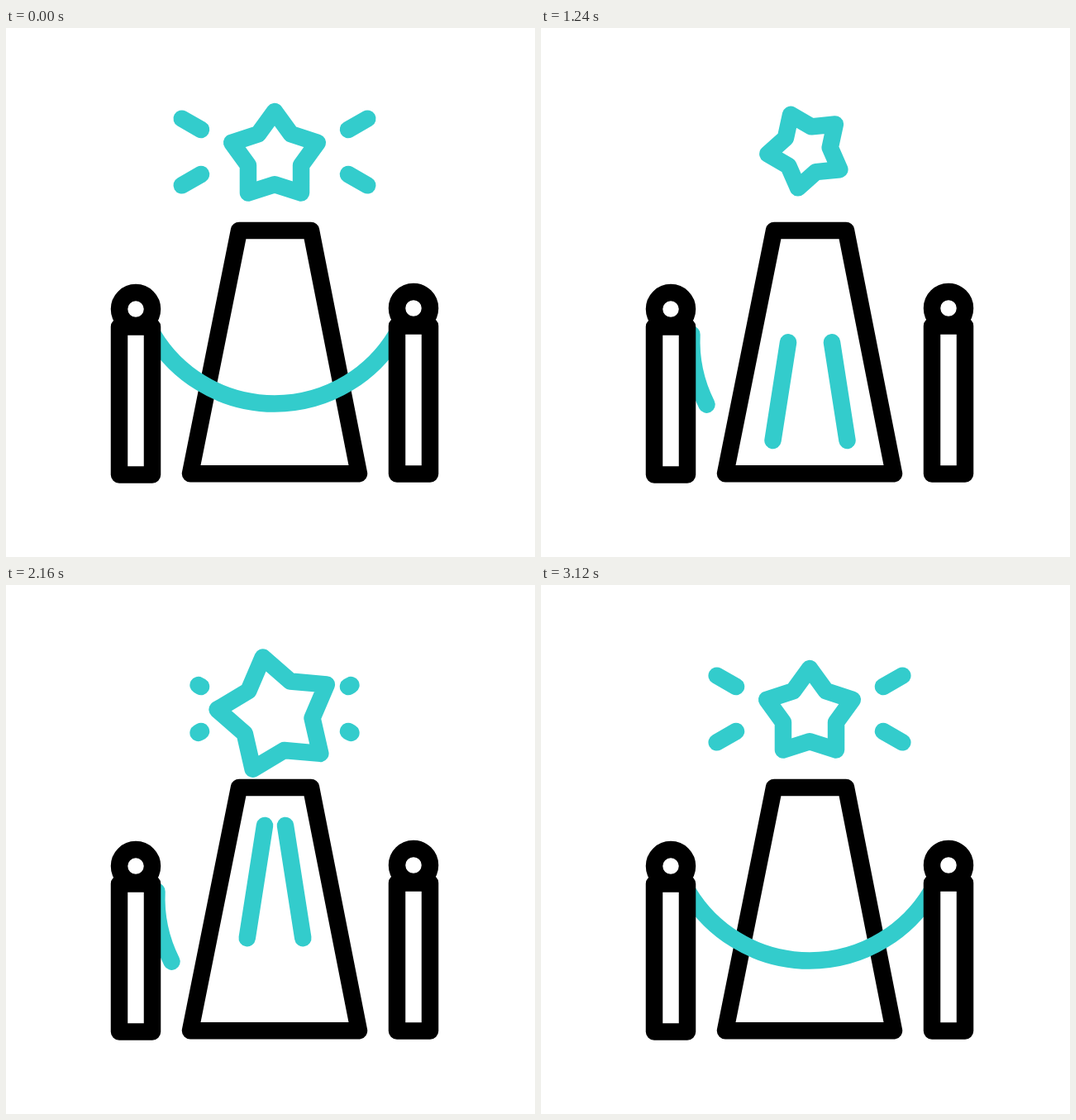
An HTML page that plays this animation: 640 px wide and 640 px high, repeating every 3.6 s.

```html
<!DOCTYPE html>
<html lang="en">
<head>
<meta charset="utf-8">
<title>Red carpet</title>
<style>
  html, body { margin: 0; width: 100%; height: 100%; overflow: hidden; background: #fff; }
  svg { display: block; width: 100vw; height: 100vh; }
  svg * { fill: none; stroke-width: 20.5; stroke-linecap: round; stroke-linejoin: round; }
  .ink { stroke: #000; }
  .teal { stroke: #33cccc; }
</style>
</head>
<body>
<svg viewBox="0 0 640 640">
  <defs>
    <g id="post" class="ink"><circle cy="-200.5" r="20"/><path d="M-20 -179H20V0H-20Z"/></g>
  </defs>
  <path class="ink" d="M282 245H369L427 539.3H223Z"/>
  <g id="carpet"></g>
  <path id="rope" class="teal"/>
  <use id="left" href="#post"/>
  <use id="right" href="#post"/>
  <g id="sparks"></g>
  <path id="star" class="teal"/>
</svg>
<script>
const LOOP = 3600, STEP = 20;
const $ = id => document.getElementById(id);
const rad = deg => deg * Math.PI / 180;
const mix = (a, b, k) => a + (b - a) * k;
const span = (t, a, b) => Math.max(0, Math.min(1, (t - a) / (b - a)));
const easeIn = (k, power) => k ** power;
const easeOut = (k, power) => 1 - (1 - k) ** power;
const sine = k => (1 - Math.cos(Math.PI * k)) / 2;
const bump = k => Math.sin(Math.PI * k);

// Three spins; the star shrinks, swells past its size and settles.
const starTurn = t => 336 * easeOut(span(t, 160, 900), 3)
  + 360 * easeOut(span(t, 900, 1820), 1.11)
  + 384 * easeIn(sine(span(t, 1820, 3120)), 1.93);
const starSize = t => 1 - .41 * sine(span(t, 160, 770))
  + .73 * span(t, 740, 2100) - .32 * sine(span(t, 2100, 2600));

// The posts lean, hop, then sway once to each side.
const tilt = t => 1.4 * bump(span(t, 160, 570)) - 5.1 * bump(2 * span(t, 570, 1120));
const lift = t => 9 * bump(span(t, 400, 616));

function addLines(id, lines) {
  return lines.map(ends => {
    const el = document.createElementNS("http://www.w3.org/2000/svg", "path");
    el.setAttribute("class", "teal");
    $(id).append(el);
    return { el, ends };
  });
}

// Shows the part of a line between two fractions of its length.
function trim({ el, ends: [x0, y0, x1, y1] }, from, to) {
  const at = k => mix(x0, x1, k) + " " + mix(y0, y1, k);
  el.setAttribute("d", from < to ? `M${at(from)}L${at(to)}` : "");
}

const sides = [-1, 1];
const carpet = addLines("carpet", sides.map(s => [325.5 + s * 45, 499, 325.5 + s * 12.5, 291]));
const sparks = addLines("sparks", sides.flatMap(x => sides.map(y =>
  [325 + x * 89, 150 + y * 27, 325 + x * 112.3, 150 + y * 40.3])));

// Corners relative to the point the star turns about.
const corners = Array.from({ length: 10 }, (_, i) => {
  const r = i % 2 ? 33.7 : 54.5, a = rad(i * 36 - 90);
  return [r * Math.cos(a), r * Math.sin(a) + 5.5];
});

function drawStar(t) {
  const size = starSize(t), a = rad(starTurn(t));
  const c = Math.cos(a) * size, s = Math.sin(a) * size;
  const points = corners.map(([x, y]) => [325 + x * c - y * s, 150 + x * s + y * c]);
  $("star").setAttribute("d", "M" + points.join("L") + "Z");
}

function drawRope(t) {
  const r = 171.5, start = 148.7, sweep = 117.4;
  const k = 1 - sine(span(t, 160, 560)) + sine(span(t, 2300, 2735));
  const point = deg => [325 + r * Math.cos(rad(deg)), 283 + r * Math.sin(rad(deg))];
  const a = point(start), b = point(start - sweep * mix(.25, 1, k));
  const x = 4 * (1 - k) + 2.1 * tilt(t);
  const y = -1.5 * (1 - k) - lift(t) - 6 * bump(span(t, 400, 1240));
  $("rope").setAttribute("d", `M${a}A${r} ${r} 0 0 0 ${b}`);
  $("rope").setAttribute("transform", `translate(${x} ${y}) rotate(${34 * (1 - k)} ${a})`);
}

function drawPost(id, t, x, y) {
  $(id).setAttribute("transform", `translate(${x} ${y - lift(t)}) rotate(${tilt(t)})`);
}

function draw(t) {
  drawStar(t);
  drawRope(t);
  drawPost("left", t, 157, 540.6);
  drawPost("right", t - 12, 493, 539.5);

  const head = easeOut(span(t, 946, 2144), 3);
  const tail = easeIn(span(t, 1200, 2490), 3.6);
  carpet.forEach(line => trim(line, tail, head));

  const leave = span(t, 160, 660), enter = sine(span(t, 2060, 2460));
  sparks.forEach(line => t < 1500 ? trim(line, leave, 1) : trim(line, 0, enter));
}

const begin = performance.now();
function frame() {
  const t = (performance.now() - begin) % LOOP;
  draw(Math.floor(t / STEP) * STEP);
  requestAnimationFrame(frame);
}
frame();
</script>
</body>
</html>
```
